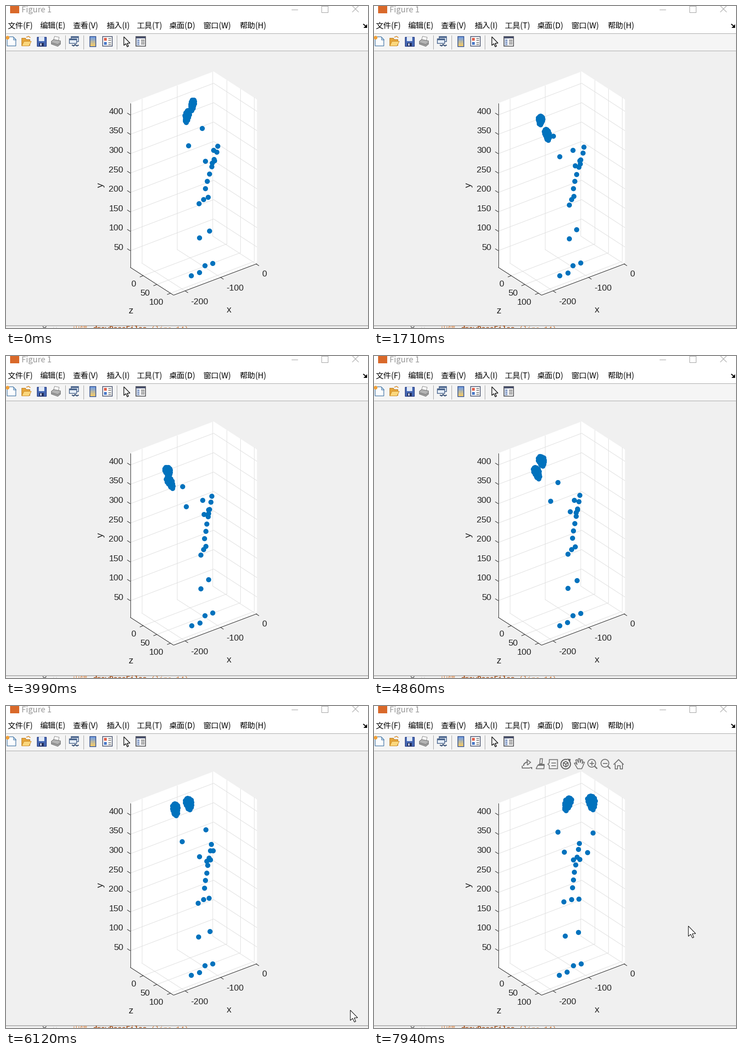
A matplotlib script for the animation above (7.99 s loop, 794 by 706 pixels).

```python
import numpy as np
import matplotlib
matplotlib.rcParams["toolbar"] = "None"
import matplotlib.pyplot as plt
from matplotlib.animation import FuncAnimation
from matplotlib.collections import LineCollection
from matplotlib.patches import Circle, Polygon

W, H, DPI = 794, 706, 100
FRAMES, STEP = 170, 47
PT = 72 / DPI
BLUE, INK, GREY = "#0072bd", "#262626", "#737373"
SANS, CJK, MONO = "Liberation Sans", "Noto Sans CJK JP", "Liberation Mono"
POINTER = np.array([(0, 0), (0, 22.5), (5, 18), (9, 26), (12, 24.5), (8.5, 17), (16, 16.5)])

fig = plt.figure(figsize=(W / DPI, H / DPI), dpi=DPI, facecolor="#f0f0f0")
ax = fig.add_axes([0, 0, 1, 1])
ax.set_xlim(0.5, W + 0.5)
ax.set_ylim(H + 0.5, 0.5)
ax.axis("off")


def poly(pts, fc="none", ec="none", lw=1.0, z=2):
    return ax.add_patch(Polygon(pts, closed=True, fc=fc, ec=ec, lw=lw * PT, zorder=z))


def rect(x0, y0, x1, y1, fc="none", ec="none", lw=1.0, z=2):
    return poly([(x0, y0), (x1, y0), (x1, y1), (x0, y1)], fc, ec, lw, z)


def line(pts, color=INK, lw=1.0, z=3):
    x, y = zip(*pts)
    return ax.plot(x, y, color=color, lw=lw * PT, zorder=z, solid_capstyle="butt")[0]


def ring(x, y, r, color=GREY, lw=2.0):
    return ax.add_patch(Circle((x, y), r, fc="none", ec=color, lw=lw * PT, zorder=4))


def lines(segs, color, lw=1.0, z=3):
    ax.add_collection(LineCollection(segs, colors=color, linewidths=lw * PT, zorder=z))


def text(x, y, s, px, font=SANS, color=INK, ha="center", va="center", **kw):
    return ax.text(x, y, s, fontsize=px * PT, family=font, color=color,
                   ha=ha, va=va, zorder=4, **kw)


# ---------- window frame ----------
def window():
    rect(0, 0, W + 1, 60, "white")
    rect(0, 60, W + 1, 98, "#f5f5f5")
    lines([[(0, y), (W + 1, y)] for y in (60, 98)], "#a4a4a4")
    rect(9, 0, 29, 16, "#d9692a")
    text(35, 14, "Figure 1", 17.8, CJK, "#999999", "left", "baseline")
    line([(626, 8), (640, 8)], "#999999")
    rect(692, 0, 706, 14, ec="#999999")
    lines([[(760, 0), (774, 14)], [(774, 0), (760, 14)]], "#999999")
    menus = {"文件(F)": 4, "编辑(E)": 75, "查看(V)": 147, "插入(I)": 221,
             "工具(T)": 287, "桌面(D)": 358, "窗口(W)": 433, "帮助(H)": 513}
    for s, x in menus.items():
        text(x, 49.5, s, 17.2, CJK, "black", "left", "baseline")
    line([(784, 40), (790, 45)], "black", 2)
    poly([(792, 40), (792, 48), (784, 48)], "black")

    line([(0, 701), (W + 1, 701)], "#a2a2a2", 1.6)
    lines([[(81, 703), (89, 711)], [(89, 703), (81, 711)]], "#555555", 1.6)
    lines([[(x, 703), (x, 708)] for x in (104, 110)], "#d0d0d0")
    text(146, 715, "出错", 17, CJK, "#dc8c50", "left", "baseline")
    text(191, 713, "drawPoseFiles", 15.2, MONO, "#a8521c", "left", "baseline", weight="bold")
    text(319, 713, "(line 14)", 15.2, MONO, "#d07838", "left", "baseline")


def toolbar():
    lines([[(x, 64), (x, 95)] for x in (130, 170, 243)], "#a0a0a0")
    # new, open
    poly([(3, 68), (16, 68), (22, 74), (22, 88), (3, 88)], "#fbfdff", "#4a7aa8", 1.4)
    poly([(16, 68), (16, 74), (22, 74)], "#c5d9ec", "#4a7aa8")
    ax.add_patch(Circle((4, 70), 4, fc="#f0a038", ec="none", zorder=3))
    poly([(35, 87), (35, 71), (43, 71), (45, 74), (53, 74), (53, 87)], "#e6a63a", "#b9781e")
    poly([(35, 88), (40, 78), (56, 78), (51, 88)], "#fbd77c", "#c98a28")
    line([(45, 69), (50, 67), (54, 70)], "#d68a2a", 1.6)
    # save
    rect(68, 68, 88, 88, "#4668b4", "#2a3f85", 1.4)
    rect(72, 68, 84, 77, "#e4ecf8")
    rect(73, 81, 83, 88, "#26315c")
    rect(75, 82, 78, 87, "#d8def0")
    # print
    poly([(104, 78), (107, 67), (117, 69), (115, 79)], "#fafafa", "#888888")
    poly([(100, 78), (105, 74), (120, 77), (120, 84), (114, 89), (100, 84)], "#b4b4b4", "#666666")
    poly([(101, 80), (114, 84), (119, 80), (119, 83), (114, 87), (101, 83)], "#8c8c8c")
    # linked windows
    for x, y, h in ((143, 67, 11), (139, 72, 10)):
        rect(x, y, x + 16, y + h, "#e6eef8", "#4a648c", 1.6)
        rect(x, y, x + 16, y + 3, "#4a648c")
    line([(145, 86), (149, 88), (152, 85), (156, 88), (160, 86)], "#3c5478", 2.4)
    # colour bar
    low, high = np.array([0.44, 0.62, 0.9]), np.array([0.96, 0.8, 0.42])
    for k in range(6):
        rect(184, 67 + 3.6 * k, 197, 70.6 + 3.6 * k, low + (high - low) * k / 5)
    rect(184, 67, 197, 89, ec="#34508c", lw=1.6)
    # legend
    rect(212, 67, 233, 88, "#fcfcfc", "#4a5470", 1.6)
    rect(215, 70, 221, 76, "#e0604c")
    rect(215, 79, 221, 85, "#4878c8")
    lines([[(224, y), (230, y)] for y in (71, 75, 80, 84)], "#5a5a5a", 1.4)
    # pointer, inspector
    poly(POINTER * 0.84 + (259, 68), "white", "#202020", 1.6)
    rect(285, 67, 306, 88, "#fcfcfc", "#48484c", 1.6)
    rect(285, 67, 306, 71, "#48506c")
    rect(286, 72, 293, 87, "#c8d4e8")
    lines([[(296, y), (304, y)] for y in (75, 79, 83)], "#505050", 1.6)
    lines([[(288, y), (292, y)] for y in (75, 79, 83)], "#4868a8", 1.4)


# ---------- 3D box ----------
LEFT, BACK = np.array([273, 573.5]), np.array([456, 504])
RIGHT, FRONT = np.array([551, 565.5]), np.array([368, 634.5])
UP = np.array([0, -360])
XV, ZV = BACK - LEFT, FRONT - LEFT
X_TICKS, Z_TICKS = np.linspace(0.137, 0.988, 3), np.linspace(0.3, 0.93, 3)
Y_TICKS = np.linspace(0.1015, 0.928, 8)


def box():
    poly([LEFT, LEFT + UP, BACK + UP, RIGHT + UP, RIGHT, FRONT], "white")
    z_out, x_out = np.array([6.7, 4.3]), np.array([-7.5, 2.9])
    grid, edges = [], [[LEFT, LEFT + UP], [LEFT, FRONT], [FRONT, RIGHT]]
    for k, f in enumerate(X_TICKS):
        p, q = LEFT + f * XV, FRONT + f * XV
        grid += [[p, p + UP], [p, q]]
        edges.append([q, q + z_out])
        text(405.5 + 78 * k, 650 - 30.3 * k, str(100 * k - 200), 19.2, ha="left")
    for k, f in enumerate(Z_TICKS):
        p, q = BACK + f * ZV, LEFT + f * ZV
        grid += [[p, p + UP], [p, q]]
        edges.append([q, q + x_out])
        text(285.5 + 30 * k, 611 + 20 * k, str(50 * k), 19.2, ha="right")
    for k, f in enumerate(Y_TICKS):
        p = LEFT + f * UP
        grid.append([p, BACK + f * UP])
        grid.append([BACK + f * UP, RIGHT + f * UP])
        edges.append([p, p - z_out])
        text(258, 531 - 42.6 * k, str(50 * (k + 1)), 19.2, ha="right")
    lines(grid, "#dedede")
    lines(edges, INK, 1.1)
    text(490, 667, "x", 21)
    text(274, 669, "z", 21)
    text(208, 393, "y", 21, rotation=90)


def axes_tools():
    g, dark = GREY, "#5f5f5f"
    # export
    art = [line([(325, 131), (325, 136), (342, 136)], g, 2),
           line([(328, 132), (330, 127), (334, 124), (338, 123)], g, 2.4),
           poly([(336, 118), (344, 124), (337, 130)], "none", g, 1.8),
           poly([(341, 134), (347, 134), (347, 139)], g),
           # brush
           poly([(365, 116), (370, 116), (369, 127), (364, 127)], "none", g, 1.8),
           poly([(361, 127), (374, 127), (374, 131), (360, 131)], g),
           poly([(360, 130), (374, 130), (373, 138), (356, 138)], "none", g, 1.8),
           # data tip
           poly([(385, 118), (403, 118), (403, 138), (385, 138), (385, 131),
                 (382, 128), (385, 125)], "none", g, 1.8),
           line([(389, 125), (399, 125)], g, 1.8),
           line([(389, 131), (399, 131)], g, 1.8)]
    # rotate
    a = np.radians(np.linspace(-35, 290, 50))
    hexagon = np.radians(np.arange(30, 390, 60))
    art += [line(list(zip(421 + 10.5 * np.cos(a), 128 + 10.5 * np.sin(a))), dark, 2.2),
            poly([(424, 116), (432, 117), (430, 124)], dark),
            poly(np.column_stack([421 + 6 * np.cos(hexagon), 128 + 6 * np.sin(hexagon)]),
                 "none", dark, 1.8),
            line([(416, 125), (421, 128), (426, 125)], dark, 1.8),
            line([(421, 128), (421, 134)], dark, 1.8),
            # hand
            poly([(440, 126), (443, 125), (446, 129), (443, 119), (446, 118), (449, 125),
                  (449, 116), (452, 116), (453, 125), (455, 118), (458, 119), (457, 127),
                  (459, 123), (462, 124), (458, 134), (456, 138), (447, 138)], "none", g, 1.8)]
    # zoom in and out
    for x in (478, 507):
        art += [ring(x, 126, 8.6, g, 1.9),
                line([(x + 6, 132), (x + 12, 138)], g, 2.6),
                line([(x - 5, 126), (x + 5, 126)], g, 1.9)]
    art.append(line([(478, 121), (478, 131)], g, 1.9))
    # home
    art += [line([(526, 129), (537, 118), (548, 129)], g, 2),
            line([(529, 127), (529, 138), (534, 138), (534, 131), (540, 131), (540, 138),
                  (545, 138), (545, 127)], g, 1.9)]
    return art


# ---------- skeleton ----------
def bump(t, mid, width):
    return np.exp(-((t - mid) / width) ** 2)


def knuckles():
    """Five fingers of four joints fanning from a narrow wrist, unit size."""
    rng = np.random.default_rng(4)
    u, s = np.meshgrid(np.linspace(-1, 1, 5), np.linspace(0, 1, 4))
    x = u * (0.55 + 0.45 * np.sin(0.7 * np.pi * s))
    y = 0.6 - s * (1.6 - 0.4 * u ** 2)
    pts = np.column_stack([x.ravel(), y.ravel()])
    pts += rng.uniform(-0.07, 0.07, pts.shape)
    return np.vstack([pts, [(0.1, 1), (-0.4, 0.8)]])


KNUCKLES = knuckles()


def hand(cx, cy, w, h, lean):
    u, v = KNUCKLES.T
    return np.column_stack([cx + w * u + lean * v, cy + h * v])


def pose(t):
    """Joint positions at t seconds, driven by a body turn and an early lean."""
    turn = np.sin(np.pi * (t - 2.7) / 11.6) ** 2
    lift = np.sin(np.pi * turn / 2)
    lean = bump(t, 0.6, 1.4)

    def turned(x, y, dx, dy):
        return np.array([x + dx * turn, y + dy * turn])

    # trunk: a bent column from the pelvis up to the neck
    pelvis = np.array([433.3, 424])
    head = turned(452, 308, -2, -7) + np.array([16, 3]) * lean
    neck = head + (-2, 13.5)
    span = neck - pelvis
    column = [pelvis + span * (h ** 1.3, h) for h in np.linspace(0.85, 0.23, 5)]
    chest = column[0]
    shoulders = [chest + turned(-3, 1, 9, 5), chest + turned(-1, 9.3, -7, -3.4)]

    hips = [pelvis + turned(4, -7.5, 13, 7.5), pelvis + turned(-4, 13, -13, -7.5)]
    knees = [turned(444.5, 490, 4.5, 7), turned(429, 511, -10, -6.5)]
    feet = [turned(453, 563.5, 1.2, 2.5), turned(436, 570, 1.5, -0.5),
            turned(425.5, 585.8, -2, -2.8), turned(407.3, 592, -0.7, -2)]

    elbow_a = (427 + 43 * turn + 11 * lean, 316.5 + 6 * turn ** 4)
    elbow_b = (437 - 20 * turn + 11 * lean, 350.5 - 31 * turn + 4 * lean)
    wrist_a = (382 + 102 * turn ** 1.3 + 15 * lean,
               293.5 - 70 * turn + 56 * turn ** 2 - 6 * lean)
    wrist_b = (402 - 72 * turn + 76 * turn ** 2 + 19 * lean, 337 - 62 * turn - 3 * lean)

    grow = t / 8
    hand_a = hand(351 + 5.5 * (t - 3.1) ** 2 + 6 * lean, 212 + 58 * bump(t, 2.87, 1.85),
                  4 + 4.3 * grow, 9 + 6.5 * turn, 2 - 4.5 * lean)
    hand_b = hand(wrist_b[0] - 36 + 2.8 * (t - 3.4) ** 2, 291 - 76 * lift,
                  4.7 + 2.3 * grow, 12.3 + 2 * turn, 5.2 * np.cos(0.55 * (t - 3.6)))
    return np.vstack([pelvis, head, neck, *column, *shoulders, *hips, *knees, *feet,
                      elbow_a, elbow_b, wrist_a, wrist_b, hand_a, hand_b])


# ---------- mouse ----------
STOPS = np.array([(5.8, 800, 715), (6.08, 756, 667), (6.5, 752, 673),
                  (7.0, 536, 296), (7.29, 536, 296), (7.85, 690, 483)])
TOOLS_ON = 6.62
ORBIT = np.radians(np.linspace(-125, 215, 60))
BARB = np.array([(-8, -7), (-1, -9), (-4, -3)])

window()
toolbar()
box()
tools = axes_tools()
dots = ax.scatter([], [], s=65, c=BLUE, linewidths=0, zorder=5)
arrow = poly(POINTER, "white", "black", 1.1, z=8)
orbit, = ax.plot([], [], color="black", lw=1.8 * PT, ls=(0, (1.2, 1.2)), zorder=8)
barb = poly(BARB, "black", z=8)


def draw(i):
    t = i * STEP / 1000
    dots.set_offsets(pose(t))
    for a in tools:
        a.set_visible(t >= TOOLS_ON)
    x, y = (np.interp(t, STOPS[:, 0], STOPS[:, k]) for k in (1, 2))
    shown, turning = t > STOPS[0, 0], x < 552
    arrow.set_visible(shown and not turning)
    arrow.set_xy(POINTER + (x, y))
    orbit.set_visible(shown and turning)
    orbit.set_data(x + 8.5 * np.cos(ORBIT), y + 8.5 * np.sin(ORBIT))
    barb.set_visible(shown and turning)
    barb.set_xy(BARB + (x, y))
    return [dots, arrow, orbit, barb, *tools]


anim = FuncAnimation(fig, draw, frames=FRAMES, interval=STEP, repeat=True,
                     repeat_delay=0, blit=False)
plt.show()
```
